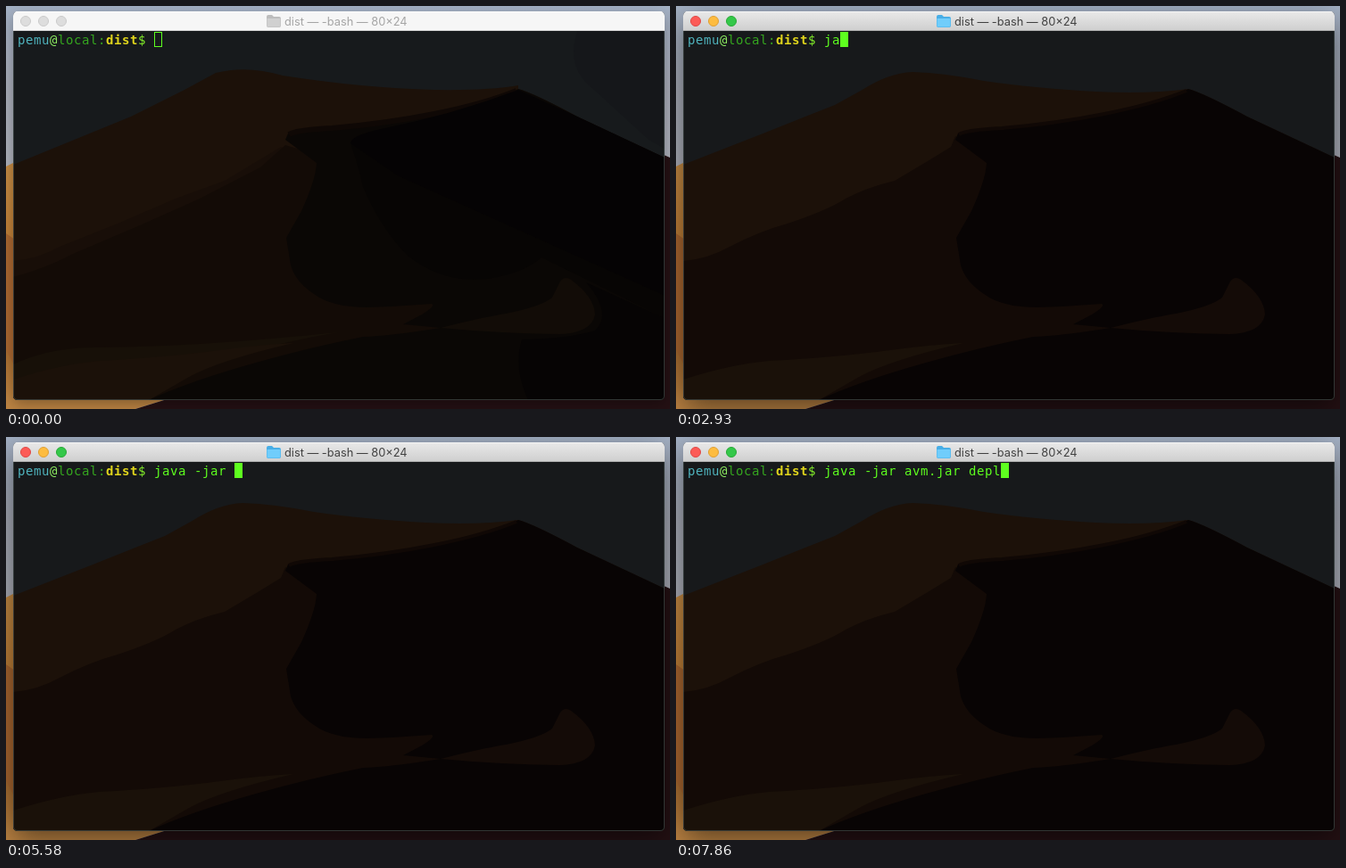
Write an HTML page with a canvas that moves like this. It is 744 px wide and 452 px high and loops after 8000 ms.

```html
<!DOCTYPE html>
<html lang="en">
<head>
<meta charset="utf-8">
<title>Terminal</title>
<style>
  html, body { margin: 0; width: 100%; height: 100%; overflow: hidden; background: #17191b; }
  canvas { display: block; }
</style>
</head>
<body>
<canvas id="stage" width="744" height="452"></canvas>
<script>
const ctx = document.getElementById('stage').getContext('2d');
const W = 744, H = 452, LOOP = 8000;
const FOCUS_AT = 840, BLINK_OFF = 1860, BLINK_ON = 2330;
const CELL = 9, LEFT = 13, BASE = 43;
const MONO = '14px "DejaVu Sans Mono", monospace';
const GREEN = '#5eff1f';

const PROMPT = [
  ['pemu', '#4fb3bd'], ['@', '#8fef62'], ['local', '#35a51f'],
  [':', '#35a51f'], ['dist', '#e0d51c', true], ['$', '#83f02a'], [' ', GREEN]
];
const COMMAND = 'java -jar avm.jar depl';
const KEY_TIMES = [
  2750, 2930, 3050, 3160, 3460, 3820, 4480, 4560, 4650, 5580, 6030,
  6620, 6680, 6850, 7060, 7140, 7210, 7320, 7500, 7560, 7740, 7860
];

function fill(color, path) {
  ctx.fillStyle = color;
  ctx.fill(new Path2D(path));
}

function gradient(y0, y1, ...colors) {
  const g = ctx.createLinearGradient(0, y0, 0, y1);
  colors.forEach((c, i) => g.addColorStop(i / (colors.length - 1), c));
  return g;
}

function desktop() {
  ctx.fillStyle = gradient(0, 180, '#a4b1c5', '#a8acb8', '#aeb1bb');
  ctx.fillRect(0, 0, W, H);
  fill(gradient(178, 452, '#c48a43', '#bd7d35', '#9c6028', '#c48a45'), 'M0 180L12 174V452H0Z');
  fill('#bd8443', 'M0 438H190L145 452H0Z');
  fill('#a96730', 'M0 255L10 262V405L0 385Z');
  fill('#241013', 'M190 438L145 452H744V170L730 164V438Z');
}

const SLOPE = 'L574 93Q592 98 640 124L738 170V442H8Z';
const DUNE = 'M8 178L100 142L150 122L178 111L207 95Q238 75 265 74Q300 75 345 84Q400 92 470 96Q530 99 574 93';
const SHADE = 'M574 93Q535 110 480 121Q425 132 365 136Q325 138 316 143L313 150' +
  'L348 176Q347 195 331 230L314 260L319 291Q325 310 345 323Q365 338 405 338' +
  'Q440 337 477 334Q482 336 466 346L445 357L487 361' +
  'Q430 370 400 371Q340 383 280 400Q205 421 160 442H738V170L640 124Q592 98 574 93Z';
const MID = 'M8 286Q35 284 60 270Q95 252 125 244Q170 229 190 216Q215 203 245 196' +
  'L282 174L308 158L313 146L360 170L500 350L490 380L170 442H8Z';
const WEDGE = 'M8 419Q60 402 105 398Q180 394 240 386Q285 380 322 378Q240 397 205 416L160 442H8Z';
const HOLLOW = 'M487 361Q530 350 560 345Q600 337 612 327L621 309Q626 302 633 307' +
  'Q659 326 660 346Q656 367 620 368Q550 367 487 361Z';

function line(color, width, path) {
  ctx.strokeStyle = color;
  ctx.lineWidth = width;
  ctx.stroke(new Path2D(path));
}

const RIDGE = 'M572 95Q535 110 480 121Q425 132 365 137Q325 139 317 144';

function activeScene() {
  fill('#17191b', 'M8 28H738V442H8Z');
  fill('#1c1109', DUNE + SLOPE);
  fill('#130a06', MID);
  fill('#1a1109', WEDGE);
  fill('#080404', SHADE);
  line('#100805', 4, RIDGE);
  fill('#140b07', HOLLOW);
}

function idleScene() {
  fill('#171a1c', 'M8 28H738V442H8Z');
  fill('#15171a', 'M640 28Q626 70 660 95L720 150L738 160V28Z');
  fill('#1c1109', 'M8 178L140 124L200 94L235 75Q270 66 310 78Q400 92 480 94Q540 95 574 89' + SLOPE);
  fill('#180e08', 'M8 286Q35 284 60 270L125 244L190 216L245 196L308 158L350 180L300 260L8 320Z');
  fill('#130b06', 'M8 304Q45 294 75 278L150 246L215 217L285 181L313 156L360 170L500 350L490 380L170 442H8Z');
  fill('#171008', 'M8 402Q50 382 105 383Q220 382 372 366Q260 385 200 416L160 442H8Z');
  fill('#1b1109', WEDGE);
  fill('#0a0705', SHADE);
  line('#0f0805', 6, RIDGE);
  fill('#050304', 'M574 94Q500 122 420 138Q387 145 386 154Q405 180 440 191L738 325V170L640 124Z');
  fill('#070504', 'M386 154Q395 180 400 203Q420 250 450 280Q490 312 540 306Q580 300 600 282L738 350V325L440 191Z');
  fill('#060404', 'M578 374Q630 373 660 364Q680 345 650 310L738 350V442H585Q568 405 578 374Z');
  fill('#120c07', HOLLOW);
}

function windowPath() {
  ctx.beginPath();
  ctx.roundRect(8, 6, 730, 436, 5);
}

function folder(active) {
  const back = active ? '#48aee6' : '#bdbdbd';
  const front = active ? '#70cdfb' : '#d0d0d0';
  fill(back, 'M292 12Q292 10 294 10H298L300 12H306Q308 12 308 14V22Q308 24 306 24H294Q292 24 292 22Z');
  fill(front, 'M292.5 14H307.5V22.5Q307 23.5 306 23.5H294Q292.5 23.5 292.5 22Z');
}

function titleBar(active) {
  ctx.fillStyle = active ? gradient(6, 28, '#e9e9e9', '#cecece') : '#f6f6f6';
  ctx.fillRect(8, 6, 730, 22);
  ctx.fillStyle = active ? '#f5f5f5' : '#fbfbfb';
  ctx.fillRect(8, 6, 730, 1);
  ctx.fillStyle = active ? '#adadad' : '#d3d3d3';
  ctx.fillRect(8, 27, 730, 1);
  const lights = active
    ? [['#fc5b57', '#df4744'], ['#fdbc40', '#de9f34'], ['#34c84a', '#27a935']]
    : Array(3).fill(['#dddddd', '#cacaca']);
  lights.forEach(([face, rim], i) => {
    ctx.beginPath();
    ctx.arc(22 + 20 * i, 17, 5.5, 0, Math.PI * 2);
    ctx.fillStyle = face;
    ctx.fill();
    ctx.strokeStyle = rim;
    ctx.lineWidth = 1;
    ctx.stroke();
  });
  folder(active);
  ctx.font = '12.8px Inter, sans-serif';
  ctx.fillStyle = active ? '#414141' : '#a5a5a5';
  ctx.fillText('dist — -bash — 80×24', 312, 22);
}

function drawWindow(active) {
  ctx.save();
  ctx.shadowColor = active ? 'rgba(0,0,0,.5)' : 'rgba(0,0,0,.3)';
  ctx.shadowBlur = active ? 32 : 16;
  ctx.shadowOffsetY = active ? 10 : 5;
  windowPath();
  ctx.fillStyle = '#17191b';
  ctx.fill();
  ctx.restore();

  ctx.save();
  windowPath();
  ctx.clip();
  if (active) activeScene(); else idleScene();
  titleBar(active);
  ctx.restore();
  line('rgba(90,105,100,.5)', 1, 'M8.5 28V437Q8.5 441.5 13 441.5H733Q737.5 441.5 737.5 437V28');
}

function typeText(text, col, color, bold) {
  ctx.font = (bold ? 'bold ' : '') + MONO;
  ctx.fillStyle = color;
  [...text].forEach((ch, i) => ctx.fillText(ch, LEFT + (col + i) * CELL, BASE));
  return col + text.length;
}

function cursor(col, t) {
  const x = LEFT + col * CELL;
  if (t < FOCUS_AT) {
    ctx.strokeStyle = GREEN;
    ctx.lineWidth = 1;
    ctx.strokeRect(x + .5, 29.5, CELL - 1, 16);
  } else if (t < BLINK_OFF || t >= BLINK_ON) {
    ctx.fillStyle = GREEN;
    ctx.fillRect(x, 29, CELL, 17);
  }
}

function render(t) {
  desktop();
  drawWindow(t >= FOCUS_AT);
  let col = 0;
  for (const [text, color, bold] of PROMPT) col = typeText(text, col, color, bold);
  const typed = KEY_TIMES.filter(k => k <= t).length;
  col = typeText(COMMAND.slice(0, typed), col, GREEN);
  cursor(col, t);
}

const start = performance.now();
function tick() {
  render((performance.now() - start) % LOOP);
  requestAnimationFrame(tick);
}
tick();
</script>
</body>
</html>
```
